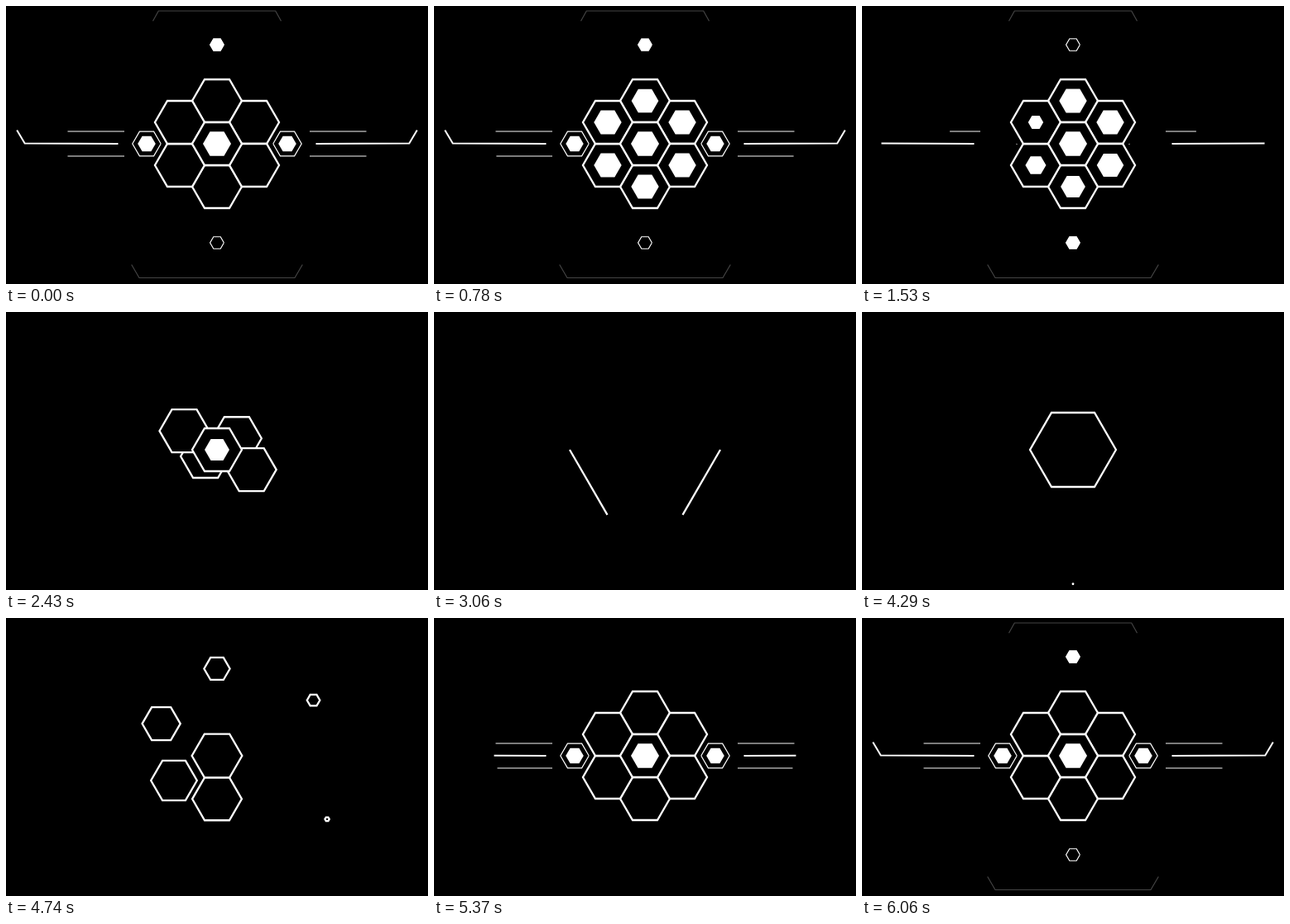
These frames come from a looping animation (510 by 337 pixels, 6150 ms). An HTML page with a canvas:

```html
<!DOCTYPE html>
<html lang="en">
<head>
<meta charset="utf-8">
<title>Hexagon loop</title>
<style>
html, body { margin: 0; width: 100%; height: 100%; overflow: hidden; background: #000; }
canvas { display: block; width: 510px; height: 337px; }
</style>
</head>
<body>
<canvas id="stage" width="510" height="337"></canvas>
<script>
const ctx = document.getElementById('stage').getContext('2d');
const LOOP = 6150, STEP = 30;
const CX = 255, CY = 167;
const WHITE = '#fff', GREY = '#a6a6a6', DIM = '#444';
const LINE = 2.3, THIN = 1.2;

const clamp = x => Math.max(0, Math.min(1, x));
const mix = (a, b, p) => a + (b - a) * p;
const quad = x => x < .5 ? 2 * x * x : 1 - 2 * (1 - x) * (1 - x);
const sine = x => (1 - Math.cos(Math.PI * x)) / 2;
const tween = (t, start, length, ease = quad) => ease(clamp((t - start) / length));

// Visible amount of a part that leaves and later comes back.
const shown = (t, out, outLen, back, backLen) =>
  t < back ? 1 - tween(t, out, outLen) : tween(t, back, backLen);

function corner(x, y, r, i) {
  const a = i * Math.PI / 3;
  return [x + r * Math.cos(a), y + r * Math.sin(a)];
}

function hexPath(x, y, r) {
  ctx.beginPath();
  for (let i = 0; i < 6; i++) ctx.lineTo(...corner(x, y, r, i));
  ctx.closePath();
}

function solid(x, y, r) {
  if (r < .1) return;
  hexPath(x, y, r);
  ctx.fillStyle = WHITE;
  ctx.fill();
}

function cell(x, y, r) {
  hexPath(x, y, r);
  ctx.fillStyle = '#000';
  ctx.fill();
  ctx.strokeStyle = WHITE;
  ctx.lineWidth = LINE;
  ctx.stroke();
}

// Strokes the first part of a polyline.
function trim(points, part, color, width) {
  if (part <= 0) return;
  const span = i => Math.hypot(points[i][0] - points[i - 1][0], points[i][1] - points[i - 1][1]);
  let left = 0;
  for (let i = 1; i < points.length; i++) left += span(i);
  left *= part;
  ctx.beginPath();
  ctx.moveTo(...points[0]);
  for (let i = 1; i < points.length && left > 0; i++) {
    const len = span(i), k = Math.min(1, left / len);
    ctx.lineTo(mix(points[i - 1][0], points[i][0], k), mix(points[i - 1][1], points[i][1], k));
    left -= len;
  }
  ctx.strokeStyle = color;
  ctx.lineWidth = width;
  ctx.stroke();
}

const ring = (x, y, r) => Array.from({ length: 7 }, (_, i) => corner(x, y, r, i));

function mirrored(draw) {
  draw();
  ctx.save();
  ctx.translate(2 * CX, 0);
  ctx.scale(-1, 1);
  draw();
  ctx.restore();
}

// Outer cells, lowest layer first: direction in degrees, leave time,
// order of the dot wave, order of arrival.
const CELLS = [
  { dir: -90, leave: 2010, wave: 5, come: 3 },
  { dir: 90, leave: 2030, wave: 2, come: 0 },
  { dir: 150, leave: 2187, wave: 1, come: 1 },
  { dir: -30, leave: 2236, wave: 4, come: 4 },
  { dir: 210, leave: 2331, wave: 0, come: 2 },
  { dir: 30, leave: 2353, wave: 3, come: 5 }
];

function outerCell(t, c) {
  let dist, size = 1;
  if (t < 3300) {
    const p = tween(t, c.leave, 400);
    if (p === 1) return;
    dist = 52 * (1 - p);
  } else {
    size = tween(t, 4260 + 75 * c.come, 500);
    if (size === 0) return;
    dist = mix(163.5, 52, size);
  }
  const a = c.dir * Math.PI / 180;
  const x = CX + dist * Math.cos(a), y = CY + dist * Math.sin(a);
  cell(x, y, 30 * size);
  const dot = tween(t, 75 + 60 * c.wave, 450) - tween(t, 1293 + 60 * c.wave, 500);
  solid(x, y, 16.7 * dot);
}

// Large hexagon: lower sides first, then the other edges.
function bigFrame(t) {
  const low = tween(t, 2820, 225), rest = tween(t, 3065, 230);
  const v = i => corner(CX, CY, 91, i);
  mirrored(() => {
    trim([v(3), v(2)], low, WHITE, LINE);
    trim([v(3), v(4)], rest, WHITE, LINE);
    trim([[CX, v(4)[1]], v(4)], rest, WHITE, LINE);
    trim([[CX, v(2)[1]], v(2)], rest, WHITE, LINE);
  });
}

function centre(t) {
  if (t < 2850) {
    const r = 30 * (1 - tween(t, 2700, 150));
    if (r > 0) cell(CX, CY, r);
  } else if (t < 3300) {
    bigFrame(t);
  } else {
    cell(CX, CY, mix(91, 30, tween(t, 3555, 1245, sine)));
  }
  solid(CX, CY, 17 * shown(t, 2332, 400, 4950, 350));
}

function side(t) {
  trim([[143, 152], [74.5, 152]], shown(t, 1285, 510, 5050, 280), GREY, 1.3);
  trim([[143, 182], [74.5, 182]], shown(t, 735, 560, 5124, 280), GREY, 1.3);
  trim([[135.5, 167], [22.7, 166.6], [13.2, 150.5]],
    shown(t, 1375, 570, 5233, 280), WHITE, 2);
  trim(ring(170, CY, 17.2), shown(t, 1110, 450, 4950, 250), WHITE, THIN);
  solid(170, CY, 10.8 * shown(t, 750, 400, 5080, 260));
}

function smallHexes(t) {
  trim(ring(CX, 47, 8.4), shown(t, 1560, 400, 5470, 250), WHITE, THIN);
  trim(ring(CX, 287, 8.4), shown(t, 1650, 400, 5400, 250), WHITE, THIN);
  solid(CX, 47, 8.6 * shown(t, 720, 400, 5600, 300));
  solid(CX, 287, 8.6 * (tween(t, 850, 400) - tween(t, 1560, 350)));
}

function brackets(t) {
  const top = shown(t, 1720, 480, 5560, 350);
  const bottom = shown(t, 1890, 500, 5680, 370);
  mirrored(() => {
    trim([[CX, 6], [184.3, 6], [177.5, 18.3]], top, DIM, 1.2);
    trim([[CX, 329.5], [161, 329.5], [151.7, 313.5]], bottom, DIM, 1.2);
  });
}

function draw(t) {
  ctx.fillStyle = '#000';
  ctx.fillRect(0, 0, 510, 337);
  brackets(t);
  mirrored(() => side(t));
  smallHexes(t);
  CELLS.forEach(c => outerCell(t, c));
  centre(t);
}

const begin = performance.now();
function tick() {
  const t = (performance.now() - begin) % LOOP;
  draw(Math.floor(t / STEP) * STEP);
  requestAnimationFrame(tick);
}
tick();
</script>
</body>
</html>
```
